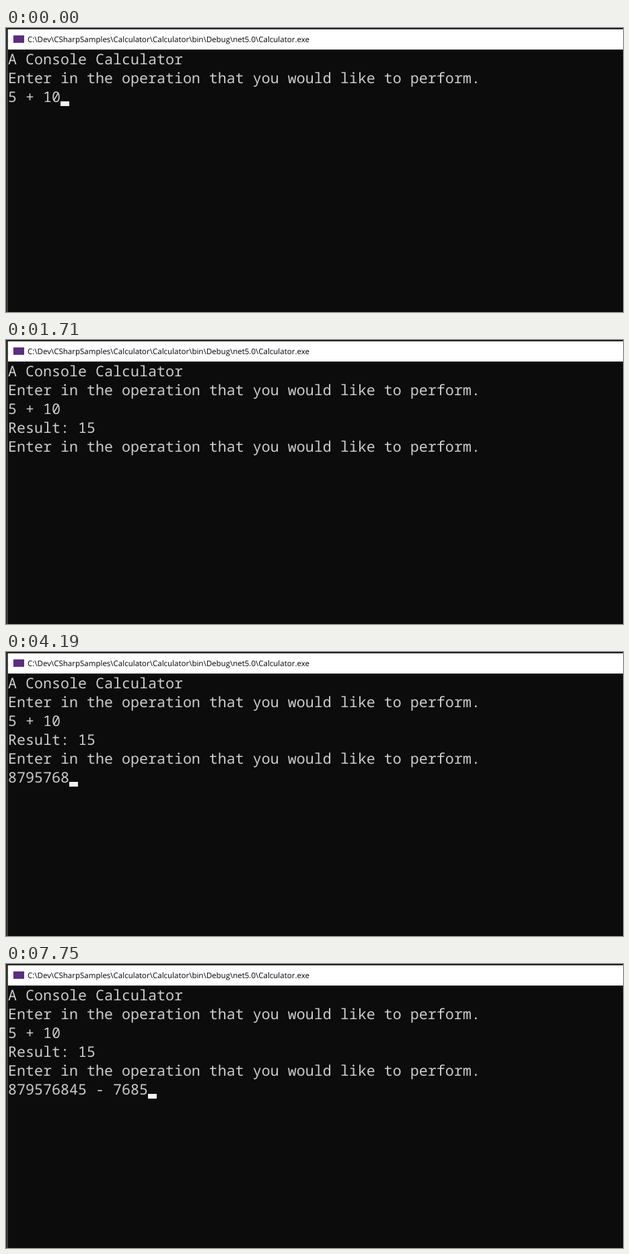
An HTML page with a canvas that plays this animation: 917 by 422 pixels, repeating every 8 s.

```html
<!DOCTYPE html>
<html lang="en">
<head>
<meta charset="utf-8">
<title>Console Calculator</title>
<style>
  html, body { margin: 0; width: 100%; height: 100%; overflow: hidden; background: #0c0c0c; }
  canvas { display: block; }
</style>
</head>
<body>
<canvas id="stage" width="917" height="422"></canvas>
<script>
const ctx = document.getElementById('stage').getContext('2d');
const LOOP = 8000, LEFT = 3, TOP = 32, CELL = 13, LINE = 28;

const TITLE = 'C:\\Dev\\CSharpSamples\\Calculator\\Calculator\\bin\\Debug\\net5.0\\Calculator.exe';
const PROMPT = 'Enter in the operation that you would like to perform.';
const START = ['A Console Calculator', PROMPT, '5 + 10'];
const INPUT = '879576845 - 7685';

// Times in ms
const ENTER = 790;
const KEYS = [2550, 2690, 2970, 3490, 3770, 4040, 4190, 4680,
              4980, 5630, 5880, 6020, 6800, 6950, 7500, 7750];
const CURSOR_OFF = [150, 1710, 2820, 3340, 3890, 4310, 4830, 5370, 5880, 6430, 6950];
const CURSOR_ON = [0, 670, ENTER, 2270, ...KEYS];

const latest = (times, t) => Math.max(-1, ...times.filter(time => time <= t));

function rect(color, x, y, w, h) {
  ctx.fillStyle = color;
  ctx.fillRect(x, y, w, h);
}

function text(value, color, font, x, y) {
  ctx.fillStyle = color;
  ctx.font = font;
  ctx.fillText(value, x, y);
}

function drawWindow() {
  rect('#222222', 0, 0, 917, 422);
  rect('#41413d', 1, 2, 2, 420);
  rect('#ffffff', LEFT, 2, 914, 30);
  rect('#0c0c0c', LEFT, TOP, 914, 390);
  rect('#5c2d80', 11, 11, 16, 11);
  text(TITLE, '#000000', '11.53px "Open Sans", sans-serif', 32, 21);
}

function drawConsole(t) {
  const typed = KEYS.filter(time => time <= t).length;
  const lines = t < ENTER ? START : [...START, 'Result: 15', PROMPT, INPUT.slice(0, typed)];
  lines.forEach((line, row) =>
    text(line, '#cccccc', '21.667px "Noto Sans Mono", monospace', LEFT, TOP + 22 + row * LINE));

  if (latest(CURSOR_ON, t) > latest(CURSOR_OFF, t)) {
    const column = lines[lines.length - 1].length;
    rect('#f2f2f2', LEFT + column * CELL, TOP + lines.length * LINE - 7, CELL, 7);
  }
}

function render(now) {
  ctx.textRendering = 'geometricPrecision';
  drawWindow();
  drawConsole(now % LOOP);
  requestAnimationFrame(() => render(performance.now()));
}
render(0);
</script>
</body>
</html>
```
